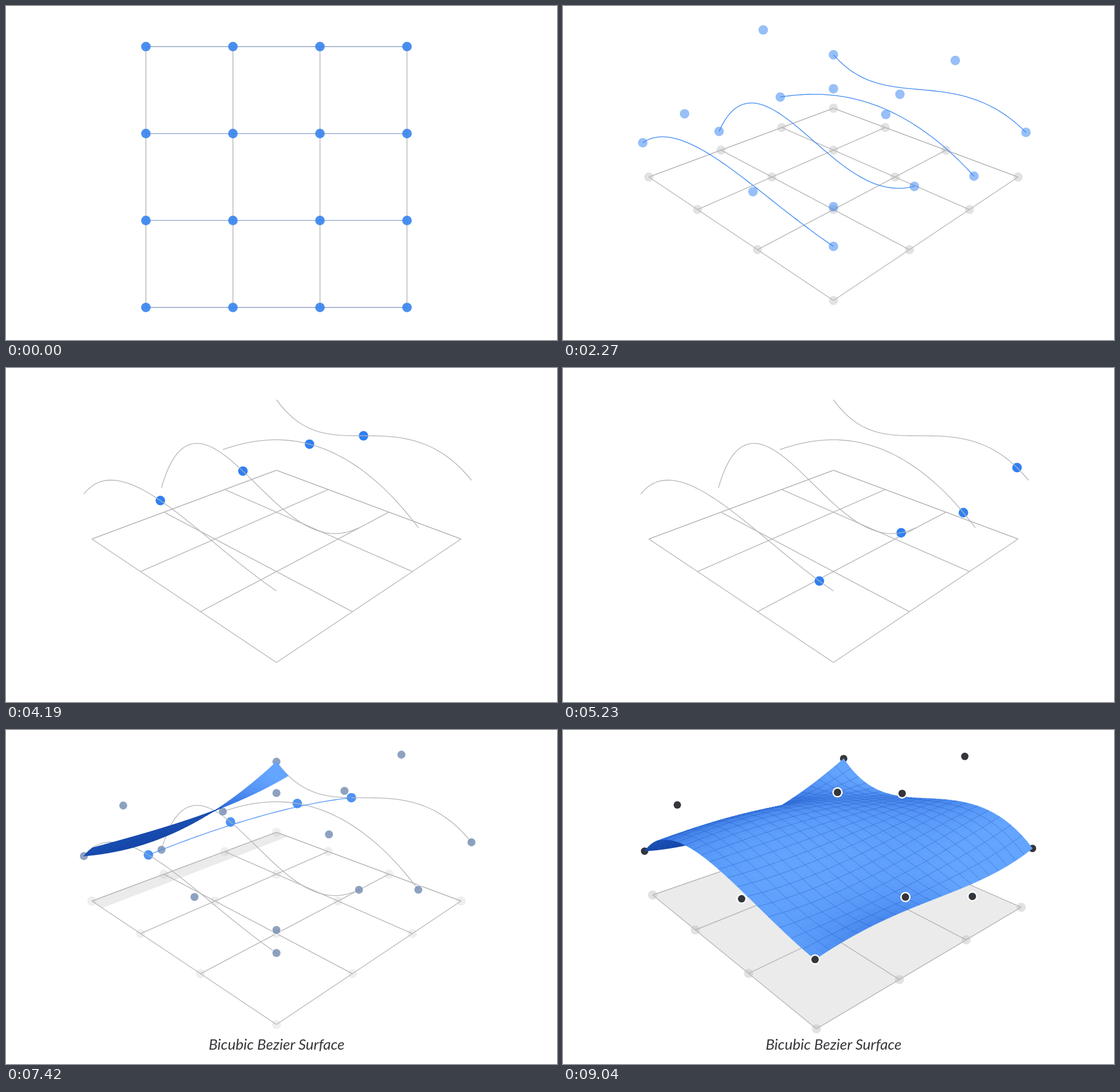
Write an HTML page with a canvas that moves like this. It is 961 px wide and 583 px high and loops after 9110 ms.

```html
<!DOCTYPE html>
<html lang="en">
<head>
<meta charset="utf-8">
<title>Bicubic Bezier Surface</title>
<style>
html, body { margin: 0; width: 100%; height: 100%; overflow: hidden; background: #fff; }
canvas { position: absolute; left: 0; top: 0; }
#caption {
  position: absolute; left: 0; top: 532px; width: 944px; text-align: center;
  font: italic 400 26px/32px Lato, "Open Sans", sans-serif; color: #36373b; opacity: 0;
}
</style>
</head>
<body>
<canvas id="stage" width="961" height="583"></canvas>
<div id="caption">Bicubic Bezier Surface</div>
<script>
const LOOP = 9110, SIZE = 455.4, DIST = 993, CX = 471.7, CY = 298.5;
const FINE = 40, CELL = 2;
const BLUE = [47, 128, 242], DARK = [52, 54, 59], GREY = [182, 182, 183];
const LINE_BLUE = [62, 136, 243], LINE_GREY = [178, 181, 187];
const RAD = Math.PI / 180;

// Control point heights, one row per curve
const H = [
  [159, 38, 228, 110.5],
  [87, 160, 198, 78],
  [50.6, 333, 6.7, 133.7],
  [85.7, 211, 123, 107]
];
// Control points that the finished surface covers
const BEHIND = new Set(["00", "01", "03", "10", "20", "21", "22", "30"]);

const ctx = document.getElementById("stage").getContext("2d");
const caption = document.getElementById("caption");

const clamp = x => Math.max(0, Math.min(1, x));
const ramp = (t, a, b) => clamp((t - a) / (b - a));
const ease = x => 0.5 - 0.5 * Math.cos(Math.PI * x);
const swing = (t, a, b) => ease(ramp(t, a, b));
const mix = (a, b, k) => a.map((v, i) => v + (b[i] - v) * k);
const rgb = (c, a = 1) => `rgba(${c.map(Math.round).join()},${a})`;
const bern = t => {
  const r = 1 - t;
  return [r * r * r, 3 * t * r * r, 3 * t * t * r, t * t * t];
};
const dot4 = (a, b) => a[0] * b[0] + a[1] * b[1] + a[2] * b[2] + a[3] * b[3];

function height(s, t) {
  const bt = bern(t);
  return dot4(bern(s), H.map(row => dot4(row, bt)));
}

const GRID = [];
for (let i = 0; i <= FINE; i++) {
  GRID.push([]);
  for (let j = 0; j <= FINE; j++) GRID[i].push(height(i / FINE, j / FINE));
}

// Camera: turn about the vertical axis, then tilt
const cam = {};
function setCamera(turn, tilt) {
  cam.ct = Math.cos(turn * RAD); cam.st = Math.sin(turn * RAD);
  cam.c = Math.cos(tilt * RAD); cam.s = Math.sin(tilt * RAD);
}
function spin(u, w) {
  return [u * cam.ct + w * cam.st, w * cam.ct - u * cam.st];
}
function place(s, t) {
  return spin((t - 0.5) * SIZE, (0.5 - s) * SIZE);
}
function project(s, t, z = 0) {
  const [x, y] = place(s, t);
  const k = DIST / (DIST + y * cam.s - z * cam.c);
  return [CX + x * k, CY - (y * cam.c + z * cam.s) * k];
}

function path(points) {
  ctx.beginPath();
  points.forEach(p => ctx.lineTo(p[0], p[1]));
}
function line(points, color, alpha = 1, width = 1.4) {
  if (alpha <= 0) return;
  path(points);
  ctx.lineWidth = width;
  ctx.strokeStyle = rgb(color, alpha);
  ctx.stroke();
}
function disc(p, r, color, alpha = 1) {
  if (alpha <= 0) return;
  ctx.beginPath();
  ctx.arc(p[0], p[1], r, 0, 2 * Math.PI);
  ctx.fillStyle = rgb(color, alpha);
  ctx.fill();
}
function eachPoint(fn) {
  for (let i = 0; i < 4; i++) for (let j = 0; j < 4; j++) fn(i, j, i / 3, j / 3);
}
function curve(at) {
  return Array.from({ length: 49 }, (_, i) => at(i / 48));
}
// Row curve i at parameter t: spreads evenly, only the height is curved
const onRow = (i, t, lift) => project(i / 3, t, lift * dot4(H[i], bern(t)));

function drawGround(fill, dots) {
  if (fill > 0) {
    path([project(0, 0), project(0, fill), project(1, fill), project(1, 0)]);
    ctx.fillStyle = "#ebebeb";
    ctx.fill();
  }
  eachPoint((i, j, s, t) => disc(project(s, t), 8, GREY, 0.4 * dots));
  for (let i = 0; i < 4; i++) {
    line([project(i / 3, 0), project(i / 3, 1)], GREY);
    line([project(0, i / 3), project(1, i / 3)], GREY);
  }
}

function drawMarkers(p, behind) {
  if (p <= 0) return;
  const color = mix(BLUE, DARK, p);
  eachPoint((i, j, s, t) => {
    if (BEHIND.has("" + i + j) !== behind) return;
    const at = project(s, t, H[i][j]);
    disc(at, 9, [255, 255, 255], p);
    disc(at, 7.6 - 1.1 * p, color, p);
  });
}

function shade(zu, zw, x, y, z) {
  const [nx, ny] = spin(-zu, -zw);
  const len = Math.hypot(nx, ny, 1);
  const lit = (0.45 * nx - 0.45 * ny + 0.77) / len;
  const facing = -nx * x + ny * (-DIST * cam.s - y) + (DIST * cam.c - z);
  if (facing < 0) return mix([20, 70, 168], [32, 92, 200], clamp(lit));
  return mix([34, 97, 212], [98, 164, 255], clamp((lit - 0.3) / 0.62));
}

// Quads run from far to near, so nearer ones cover the rest
function drawSurface(grow, mesh) {
  if (grow <= 0) return;
  const last = Math.ceil(grow * FINE - 1e-6);
  const ts = Array.from({ length: last + 1 }, (_, j) => Math.min(j / FINE, grow));
  const zs = GRID.map((row, i) => ts.map((t, j) => t === j / FINE ? row[j] : height(i / FINE, t)));
  const ps = zs.map((row, i) => row.map((z, j) => project(i / FINE, ts[j], z)));
  const step = SIZE / FINE;
  for (let i = 0; i < FINE; i++) {
    for (let j = 0; j < last; j++) {
      const a = zs[i][j], b = zs[i][j + 1], c = zs[i + 1][j + 1], d = zs[i + 1][j];
      const du = (ts[j + 1] - ts[j]) * SIZE;
      if (du < 1e-6) continue;
      const [x, y] = place((i + 0.5) / FINE, (ts[j] + ts[j + 1]) / 2);
      const color = rgb(shade((b + c - a - d) / 2 / du, (a + b - c - d) / 2 / step,
        x, y, (a + b + c + d) / 4));
      path([ps[i][j], ps[i][j + 1], ps[i + 1][j + 1], ps[i + 1][j]]);
      ctx.closePath();
      ctx.fillStyle = ctx.strokeStyle = color;
      ctx.lineWidth = 0.7;
      ctx.fill();
      ctx.stroke();
      if (i && i % CELL === 0) line([ps[i][j], ps[i][j + 1]], [36, 88, 190], 0.5 * mesh, 1);
      if (j && j % CELL === 0) line([ps[i][j], ps[i + 1][j]], [36, 88, 190], 0.5 * mesh, 1);
    }
  }
}

function draw(t) {
  const turn = swing(t, 700, 1735);
  const lift = swing(t, 1600, 2585);
  const drift = t > 7500 ? ((t - 7500) / 1540) ** 2 : 0;
  setCamera(45 * turn + 3.8 * drift, 61.4 * turn - 1.4 * drift);

  const start = ramp(t, 0, 370);
  const toGrey = ramp(t, 2700, 3600);
  const marks = ramp(t, 6870, 7870);
  const grow = swing(t, 7130, 8750);
  const slide = swing(t, 2690, 5665) - swing(t, 5880, 8760);
  const fade = 1 - ramp(t, 7200, 8700);
  const runners = ramp(t, 2690, 3000) * fade;

  ctx.clearRect(0, 0, 961, 583);
  drawGround(grow, 1 - ramp(t, 2300, 2570) + marks);

  const soft = (0.85 - 0.35 * start) * (1 - toGrey);
  eachPoint((i, j, s, u) => disc(project(s, u, H[i][j] * lift), 8.3, BLUE, soft));

  const spots = H.map((_, i) => onRow(i, slide, lift));
  spots.forEach(p => disc(p, 8.3, BLUE, runners));

  const rowColor = mix(LINE_BLUE, LINE_GREY, toGrey);
  const rowAlpha = (0.35 + 0.65 * start) * (1 - ramp(t, 8250, 8700));
  H.forEach((_, i) => line(curve(u => onRow(i, u, lift)), rowColor, rowAlpha, 1.3));

  drawMarkers(marks, true);
  drawSurface(grow, ramp(t, 7600, 8500));
  const cross = ramp(t, 5880, 6200) * fade;
  if (cross > 0) line(curve(s => project(s, slide, height(s, slide))), LINE_BLUE, cross);
  drawMarkers(marks, false);

  caption.style.opacity = ramp(t, 6870, 7400);
}

const begin = performance.now();
function tick() {
  draw((performance.now() - begin) % LOOP);
  requestAnimationFrame(tick);
}
tick();
</script>
</body>
</html>
```
